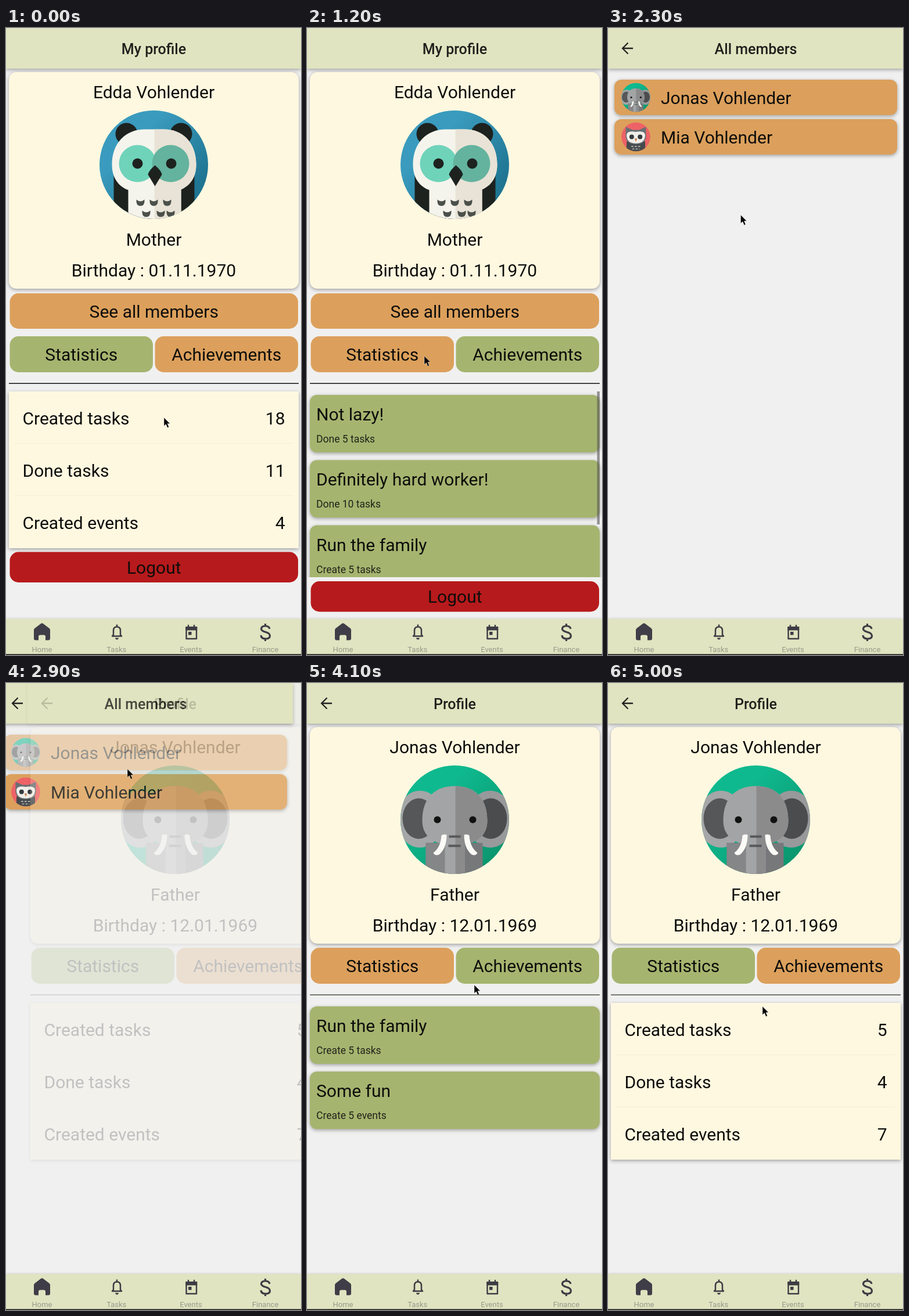
An HTML page for the animation above (5.1 s loop, 508 by 1080 pixels).

```html
<!DOCTYPE html>
<html lang="en">
<head>
<meta charset="utf-8">
<title>Family profile</title>
<style>
html, body { margin: 0; width: 100%; height: 100%; overflow: hidden; background: #f0f0f0; }
svg { display: block; width: 508px; height: 1080px; }
text { font: 30px Roboto, sans-serif; fill: #0d0d0b; }
.title { font-size: 25px; font-weight: 500; fill: #20201d; }
.small { font-size: 17.5px; fill: #20231a; }
.nav { font-size: 13px; fill: #989a8b; }
.mid { text-anchor: middle; }
.end { text-anchor: end; }
.shadow { filter: drop-shadow(0 2px 3px rgba(0, 0, 0, .34)); }
.line { fill: none; stroke: #3d3c44; stroke-linejoin: round; }
</style>
</head>
<body>
<svg viewBox="0 0 508 1080">
  <defs>
    <clipPath id="round"><circle r="93.5"/></clipPath>
    <clipPath id="right"><rect x="1" y="-100" width="100" height="200"/></clipPath>
    <clipPath id="list"><rect y="626" width="508" height="320"/></clipPath>
    <linearGradient id="sky" x2="1" y2="1">
      <stop offset=".3" stop-color="#3a9bbe"/><stop offset=".8" stop-color="#1f7592"/>
    </linearGradient>
    <linearGradient id="leaf" x2="1" y2="1">
      <stop offset=".3" stop-color="#0fb98f"/><stop offset=".9" stop-color="#0a946c"/>
    </linearGradient>

    <g id="owl" clip-path="url(#round)">
      <circle r="94" fill="url(#sky)"/>
      <g fill="#1d221f">
        <circle cx="-47" cy="-53" r="19"/><circle cx="47" cy="-53" r="19"/>
        <path d="M-69 10V95H70V10Z"/>
      </g>
      <path id="owlFace" d="M-44 30H47V95H-44Z M-72 0C-72-38-48-61-15-61H17C50-61 73-38 73 0C73 32 50 47 25 47H-24C-50 47-72 32-72 0Z" fill="#f5f4ec"/>
      <use href="#owlFace" clip-path="url(#right)" style="filter:brightness(.91) sepia(.12)"/>
      <circle cx="-28" cy="-2" r="32" fill="#6fd3ba"/>
      <circle cx="29" cy="-2" r="32" fill="#64b39f"/>
      <g fill="#1d221f">
        <circle cx="-28" cy="-2" r="9"/><circle cx="30" cy="-2" r="9"/>
        <path d="M2 1Q13 10 14 17L2 37L-10 17Q-9 10 2 1Z"/>
      </g>
      <g fill="#4b504b" id="feathers"></g>
    </g>

    <g id="elephant" clip-path="url(#round)">
      <circle r="94" fill="url(#leaf)"/>
      <ellipse cx="-60" cy="-1" rx="40" ry="49" fill="#a5a6a7"/>
      <ellipse cx="61" cy="-1" rx="40" ry="49" fill="#98999b"/>
      <ellipse cx="-62" cy="-2" rx="28" ry="35" fill="#555759"/>
      <ellipse cx="62" cy="-2" rx="28" ry="35" fill="#4b4c4e"/>
      <path d="M-50 95V40H48V95Z" fill="#77787a"/>
      <path d="M-50 95V40H-17V95Z" fill="#858687"/>
      <path id="trunk" d="M-56 2C-56-38-34-58 0-58S56-38 56 2C56 27 38 40 17 42V95H-17V42C-38 40-56 27-56 2Z" fill="#a3a4a5"/>
      <use href="#trunk" clip-path="url(#right)" style="filter:brightness(.85)"/>
      <circle cx="-30" cy="0" r="6" fill="#111"/><circle cx="31" cy="0" r="6" fill="#111"/>
      <g fill="#fbfaf6">
        <path id="tusk" d="M-23 27Q-19 24-14 26Q-14 49-27 60Q-34 63-37 57Q-24 47-23 27Z"/>
        <use href="#tusk" transform="translate(2) scale(-1 1)"/>
      </g>
      <path d="M-10 29H10M-11 45H10" stroke="#56585a" stroke-width="4"/>
    </g>

    <g id="bird" clip-path="url(#round)">
      <circle r="94" fill="#ee6266"/>
      <path d="M-60 95V30H60V95Z" fill="#454a4d"/>
      <path d="M-65-65L-20-45H20L65-65L66 0Q60 48 0 48T-66 0Z" fill="#6a6f72"/>
      <path d="M-60-12Q-58-42 0-32Q58-42 60-12Q60 42 0 42T-60-12Z" fill="#f0eeea"/>
      <circle cx="-27" cy="0" r="15" fill="#353a3d"/><circle cx="27" cy="0" r="15" fill="#353a3d"/>
      <path d="M-9 10H9L0 32Z" fill="#c8804c"/>
      <path d="M-30 62H30M-24 78H24" stroke="#a9aaab" stroke-width="7" stroke-dasharray="14 8"/>
    </g>
  </defs>

  <rect width="508" height="1080" fill="#f0f0f0"/>
  <g id="pages"></g>

  <g id="navbar">
    <rect class="shadow" y="1018" width="508" height="62" fill="#e0e4c0"/>
    <path fill="#3f3d47" d="M60 1026q2-1.500 4 0l10.500 8q1.500 1.200 1.500 3v14.500q0 3-3 3h-5v-6q0-3-3-3h-6q-3 0-3 3v6h-5q-3 0-3-3v-14.500q0-1.800 1.500-3z"/>
    <path class="line" stroke-width="2.500" d="M183 1047.500h16l-2-2.500v-7q0-6.500-6-6.500t-6 6.500v7zM191 1027.500v3.500"/>
    <path fill="#3d3c44" d="M188 1050.500h6q-.500 3-3 3t-3-3z"/>
    <path class="line" stroke-width="2.400" d="M310.500 1033h17.500v19h-17.500zM314 1028v4M324 1028v4"/>
    <path fill="#3d3c44" d="M309.300 1031h19.900v6.500h-19.900zM314 1040h5.500v5.500h-5.500z"/>
    <path class="line" stroke-width="3.200" d="M454 1035q-1-5-7.500-5t-7 5q0 3.500 7.500 5.500t7.500 6.500q0 5-7.500 5t-8-6M446.500 1026v4M446.500 1052v4"/>
    <path d="M0 1079.300H508" stroke="#111" stroke-width="1.400"/>
  </g>
  <path id="cursor" d="M0 0V14.500L3.400 11.500L6 17.500L8.500 16.400L6 10.600H10.400Z" fill="#050505" stroke="#fff" stroke-opacity=".6" stroke-width=".7"/>
</svg>

<script>
const STEP = 100, STEPS = 51;
const ORANGE = '#dca05c', GREEN = '#a5b56f', CREAM = '#fff8e0';
const $ = id => document.getElementById(id);

const text = (x, y, s, cls = '') => `<text x="${x}" y="${y}" class="${cls}">${s}</text>`;
const box = (x, y, w, h, r, fill, cls = '') =>
  `<rect x="${x}" y="${y}" width="${w}" height="${h}" rx="${r}" fill="${fill}" class="${cls}"/>`;
const group = (body, dx = 0, dy = 0, opacity = 1) =>
  `<g transform="translate(${dx} ${dy})" opacity="${opacity}">${body}</g>`;
const button = (x, y, w, h, label, fill, opacity = 1) =>
  group(box(x, y, w, h, 15, fill) + text(x + w / 2, y + h / 2 + 11, label, 'mid'), 0, 0, opacity);
const avatar = (id, x, y, scale = 1) =>
  `<use href="#${id}" transform="translate(${x} ${y}) scale(${scale})"/>`;

$('feathers').innerHTML = [[-23, 66], [0, 66], [23, 66], [-13, 85], [12, 85], [29, 85]]
  .map(([x, y]) => `<path d="M${x - 7} ${y - 6}q7 6 14 0q1 11-7 11t-7-11z"/>`).join('');
$('navbar').innerHTML += ['Home', 'Tasks', 'Events', 'Finance']
  .map((label, i) => text(62 + 128.2 * i, 1075, label, 'nav mid')).join('');

function header(title, back) {
  return box(0, 0, 508, 70, 0, '#e0e4c0', 'shadow') + text(254.5, 45, title, 'title mid') +
    (back ? '<path d="M43 35H25m9.500-9.500L25 35l9.500 9.500" fill="none" stroke="#222" stroke-width="2.300"/>' : '');
}

function statistics(counts) {
  const row = (label, i) => text(28.5, 683 + 90 * i, label) + text(480.5, 683 + 90 * i, counts[i], 'end') +
    (i ? `<path d="M14 ${625.5 + 90 * i}H495" stroke="#f6efd8"/>` : '');
  return box(5, 626, 499, 270, 1, CREAM, 'shadow') +
    ['Created tasks', 'Done tasks', 'Created events'].map(row).join('');
}

function achievements(items) {
  const card = ([name, rule], i) => group(box(5, 632, 499, 99, 12, GREEN, 'shadow') +
    text(16, 676, name) + text(16, 714, rule, 'small'), 0, 112.3 * i);
  return `<g clip-path="url(#list)">${items.map(card).join('')}</g>`;
}

const mother = {
  title: 'My profile', name: 'Edda Vohlender', role: 'Mother', born: '01.11.1970', picture: 'owl',
  counts: [18, 11, 4], own: true, rule: '#111',
  awards: [['Not lazy!', 'Done 5 tasks'], ['Definitely hard worker!', 'Done 10 tasks'], ['Run the family', 'Create 5 tasks']]
};
const father = {
  title: 'Profile', name: 'Jonas Vohlender', role: 'Father', born: '12.01.1969', picture: 'elephant',
  counts: [5, 4, 7], own: false, rule: '#4c5544',
  awards: [['Run the family', 'Create 5 tasks'], ['Some fun', 'Create 5 events']]
};

function profile(p, showAwards, fade) {
  const lower = button(6.5, 531, 246.5, 62, 'Statistics', showAwards ? ORANGE : GREEN, fade.stats) +
    button(256.5, 531, 246.5, 62, 'Achievements', showAwards ? GREEN : ORANGE, fade.awards) +
    `<path d="M5 612.300H504" stroke="${p.rule}" stroke-width="1.600"/>` +
    (showAwards ? achievements(p.awards) : statistics(p.counts));
  const extras = p.own
    ? button(6.5, 457, 496.5, 61, 'See all members', ORANGE, fade.all) +
      button(6.5, showAwards ? 953 : 902.5, 496.5, 52.5, 'Logout', '#b71a1c') +
      (showAwards ? box(499.5, 626, 4.5, 229, 0, 'rgba(85,85,85,.6)') : '')
    : '';
  return header(p.title, !p.own) + box(5, 76, 499, 373, 13, CREAM, 'shadow') +
    text(254.5, 121, p.name, 'mid') + avatar(p.picture, 254.5, 235.5) +
    text(254.5, 374.5, p.role, 'mid') + text(254.5, 428, 'Birthday : ' + p.born, 'mid') +
    group(lower, 0, p.own ? 0 : -75) + extras;
}

function members(fade) {
  const row = (y, name, picture, opacity) => group(box(11, y, 487, 61, 12, ORANGE, 'shadow') +
    avatar(picture, 48, y + 30.5, .267) + text(91, y + 42, name), 0, 0, opacity);
  return header('All members', true) + row(89, father.name, 'elephant', fade) +
    row(157, 'Mia Vohlender', 'bird', 1);
}

// Opacity of a tapped control that was pressed at the given step
const tap = (n, start) => [.2, .2, .5, .75][n - start] ?? 1;

// Slide and fade from one page to the next, beginning at the given step
function transition(n, start, from, to) {
  if (n < start) return from;
  if (n === start) return group(from, -14) + group(to, 37, 0, .2);
  if (n === start + 1) return group(from, -2, 0, .05) + group(to, 5, 0, .95);
  return to;
}

function scene(n) {
  if (n < 26) {
    const fade = { awards: tap(n, 6), stats: tap(n, 13), all: tap(n, 19) };
    return transition(n, 21, profile(mother, n >= 8 && n < 15, fade), members(1));
  }
  const fade = { awards: tap(n, 37), stats: tap(n, 43), all: 1 };
  return transition(n, 29, members(tap(n, 27)), profile(father, n >= 39 && n < 45, fade));
}

const path = [
  [0, 272, 671], [5, 372, 566], [7, 372, 566], [12, 202, 565], [14, 202, 565], [18, 246, 504],
  [20, 246, 504], [26, 211, 140], [28, 211, 140], [29, 209, 148], [33, 194, 570], [36, 330, 496],
  [38, 330, 496], [41, 288, 520], [43, 190, 492], [45, 190, 492], [50, 266, 557]
];

function cursorAt(n) {
  const i = Math.max(1, path.findIndex(p => p[0] >= n));
  const [a, ax, ay] = path[i - 1], [b, bx, by] = path[i];
  const u = (n - a) / (b - a), e = u * u * (3 - 2 * u);
  return [ax + (bx - ax) * e, ay + (by - ay) * e];
}

const start = performance.now();
let shown = -1;
function draw() {
  const n = Math.floor((performance.now() - start) / STEP) % STEPS;
  if (n !== shown) {
    shown = n;
    $('pages').innerHTML = scene(n);
    $('cursor').setAttribute('transform', `translate(${cursorAt(n)})`);
  }
  requestAnimationFrame(draw);
}
draw();
</script>
</body>
</html>
```
